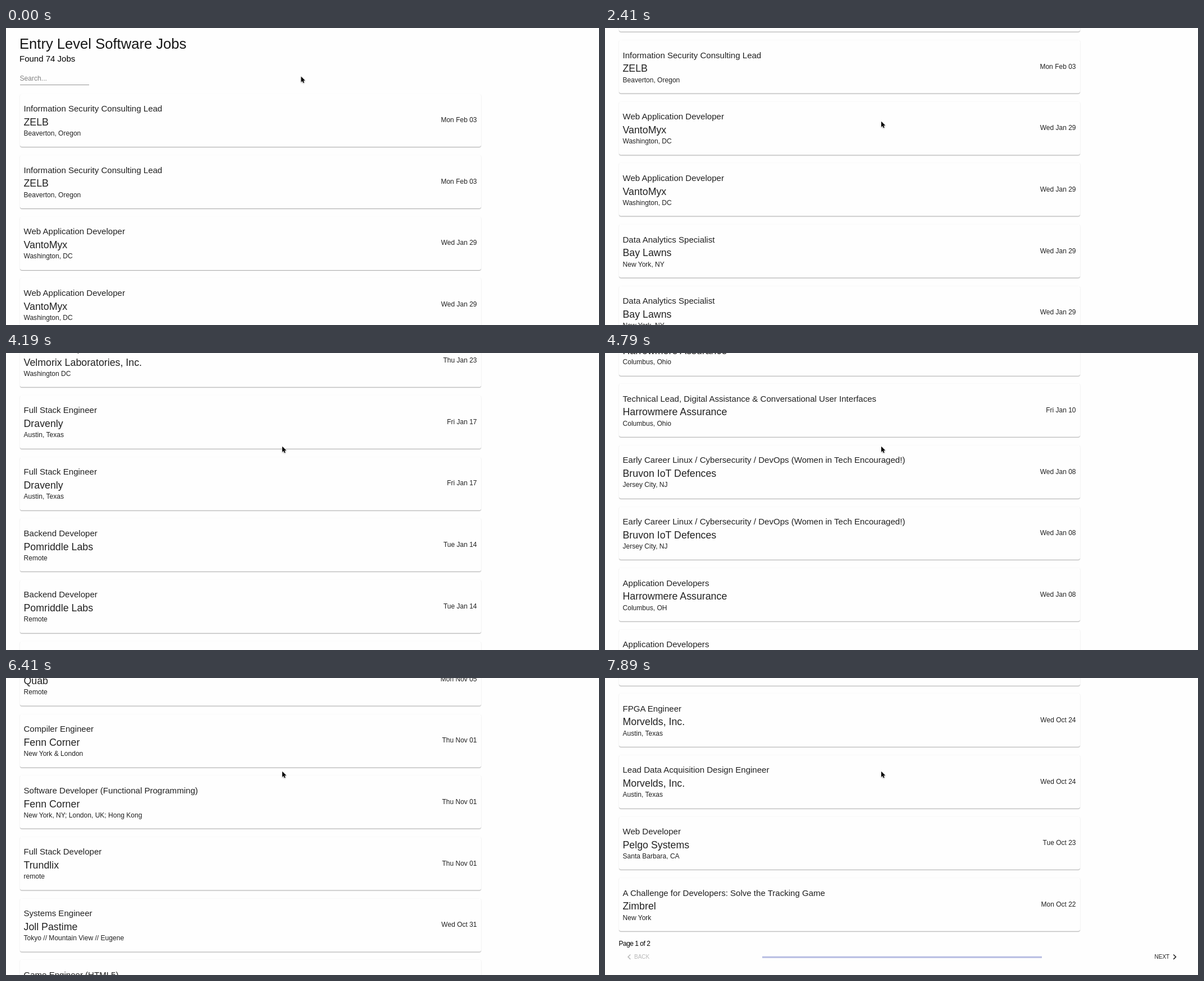
These frames come from a looping animation (1056x530 px, 8 s). An HTML page:

```html
<!DOCTYPE html>
<html lang="en">
<head>
<meta charset="utf-8">
<title>Job list</title>
<style>
  html, body { margin: 0; width: 100%; height: 100%; overflow: hidden; background: #fefefe; }
  body { position: relative; font-family: "Liberation Sans", Arial, sans-serif; color: #212121; }
  #page { position: absolute; left: 0; top: 0; width: 1056px; padding-top: 117.5px; box-sizing: border-box; }
  .pin { position: absolute; white-space: pre; }
  h1 { margin: 0; left: 24px; top: 12.1px; font: 25.6px/32px "Liberation Sans", Arial, sans-serif; color: #161616; }
  .found { left: 24px; top: 44.7px; font-size: 15px; line-height: 20px; color: #000; }
  .search { left: 24.5px; top: 82.2px; width: 123px; height: 19px; font-size: 12.1px; line-height: 16px;
    color: #808080; border-bottom: 1px solid #949494; }
  .card { display: flex; align-items: center; justify-content: space-between; box-sizing: border-box;
    margin: 0 0 14.77px 24.5px; width: 821.5px; padding: 14.4px 7.5px 16.3px 7px; border-radius: 3.4px;
    white-space: pre; background: #fefefe;
    box-shadow: 0 1px .6px rgba(0,0,0,.26), 0 .9px 2.4px rgba(0,0,0,.12); }
  .job { font-size: 15.06px; line-height: 23.8px; }
  .company { font-size: 17.8px; line-height: 25.2px; }
  .place { font-size: 12.06px; line-height: 15.2px; }
  .date { position: relative; top: 1px; font-size: 12px; line-height: 17.8px; }
  .date.narrow { width: 56px; }
  footer { position: relative; height: 63px; }
  .count { left: 24.5px; top: .4px; font-size: 12px; line-height: 14px; letter-spacing: -.5px; color: #000; }
  .button { top: 24.4px; font-size: 10px; line-height: 14px; }
  .bar { left: 279.5px; top: 29.8px; width: 498.5px; height: 2.8px; background: #b6bce2; }
  svg { position: absolute; left: 0; top: 0; overflow: visible; }
  .chevron { fill: none; stroke-width: 1.6; }
  #cursor { filter: drop-shadow(0 1px .8px rgba(0,0,0,.35)); }
</style>
</head>
<body>
<div id="page">
  <h1 class="pin">Entry Level Software Jobs</h1>
  <div class="pin found">Found 74 Jobs</div>
  <div class="pin search">Search...</div>
  <div id="list"></div>
  <footer>
    <div class="pin count">Page 1 of 2</div>
    <div class="pin button" style="left:52px;color:#b8b8b8">BACK</div>
    <div class="pin bar"></div>
    <div class="pin button" style="left:978.5px">NEXT</div>
    <svg width="1056" height="63">
      <path class="chevron" stroke="#b8b8b8" d="M45.3 26.8l-4.2 4.2 4.2 4.2"/>
      <path class="chevron" stroke="#212121" d="M1012.3 26.8l4.2 4.2-4.2 4.2"/>
    </svg>
  </footer>
</div>
<svg id="cursor" width="10" height="14">
  <path d="M0 0V10L2.3 7.9 3.9 11.5 5.6 10.8 4 7.2H7.2Z" fill="#000" stroke="#fff" stroke-width=".8" paint-order="stroke"/>
</svg>
<script>
// copies | job | company | place | date
const jobs = `
2|Information Security Consulting Lead|ZELB|Beaverton, Oregon|Mon Feb 03
2|Web Application Developer|VantoMyx|Washington, DC|Wed Jan 29
2|Data Analytics Specialist|Bay Lawns|New York, NY|Wed Jan 29
2|Junior Software Engineer|Ostrivane|Chicago, IL|Tue Jan 28
2|Front End Developer|Kelmory Group|Boston, MA|Mon Jan 27
2|DevOps Engineer (Remote)|ZipNeth|Oakland|Fri Jan 24
2|Software Developer|Larkenholme Gallery of Craft|Minneapolis|Thu Jan 23
2|Mobile Developer – Android, iOS|Velmorix Laboratories, Inc.|Washington DC|Thu Jan 23
2|Full Stack Engineer|Dravenly|Austin, Texas|Fri Jan 17
2|Backend Developer|Pomriddle Labs|Remote|Tue Jan 14
2|Technical Lead, Digital Assistance & Conversational User Interfaces|Harrowmere Assurance|Columbus, Ohio|Fri Jan 10
2|Early Career Linux / Cybersecurity / DevOps (Women in Tech Encouraged!)|Bruvon IoT Defences|Jersey City, NJ|Wed Jan 08
2|Application Developers|Harrowmere Assurance|Columbus, OH|Wed Jan 08
2|Web Developer|Tolvey Foundation|New York, New York|Mon Nov 19
2|RFP: JavaScript component for embedding a list of Podcast Episodes in Website Builders with specific/functionality for Wordpress|Murmelaatz|Remote|Mon Nov/19
2|Voice recording web app|Murmelatz|Remote|Mon Nov 19
2|Software Engineer|Ostrivane|New York|Mon Nov 12
2|Full Stack Engineer|Quab|Remote|Mon Nov 05
1|Compiler Engineer|Fenn Corner|New York & London|Thu Nov 01
1|Software Developer (Functional Programming)|Fenn Corner|New York, NY; London, UK; Hong Kong|Thu Nov 01
1|Full Stack Developer|Trundlix|remote|Thu Nov 01
1|Systems Engineer|Joll Pastime|Tokyo // Mountain View // Eugene|Wed Oct 31
1|Game Engineer (HTML5)|Joll Pastime|Tokyo // Mountain View // Eugene|Wed Oct 31
2|Software Engineer|Dravenly|San Francisco, CA|Tue Oct 30
2|Backend Developer|Kelmory Group|London|Mon Oct 29
1|Embedded Engineer|Morvelds, Inc.|Austin, Texas|Wed Oct 24
1|FPGA Engineer|Morvelds, Inc.|Austin, Texas|Wed Oct 24
1|Lead Data Acquisition Design Engineer|Morvelds, Inc.|Austin, Texas|Wed Oct 24
1|Web Developer|Pelgo Systems|Santa Barbara, CA|Tue Oct 23
1|A Challenge for Developers: Solve the Tracking Game|Zimbrel|New York|Mon Oct 22`;

const list = document.getElementById('list');
const page = document.getElementById('page');
const cursor = document.getElementById('cursor');

// A slash without spaces marks a line break.
const wrap = text => text.replace(/([^\s/])\/(?=[^\s/])/g, '$1\n');

function add(parent, className, text = '') {
  const box = document.createElement('div');
  box.className = className;
  box.textContent = text;
  return parent.appendChild(box);
}

for (const line of jobs.trim().split('\n')) {
  const [copies, job, company, place, date] = line.split('|');
  for (let i = 0; i < copies; i++) {
    const card = add(list, 'card');
    const text = add(card, 'text');
    add(text, 'job', wrap(job));
    add(text, 'company', company);
    add(text, 'place', place);
    add(card, date.includes('/') ? 'date narrow' : 'date', wrap(date));
  }
}

const LOOP = 8000;
// Screen updates: first time, last time, count
const bursts = [
  [300, 890, 5], [1340, 1640, 3], [2080, 2410, 3], [2550, 3000, 4], [3150, 3590, 4],
  [3740, 4190, 4], [4340, 5240, 7], [5390, 6410, 7], [6560, 7600, 8], [7740, 7890, 2]
];
// Scrolling ends with a small bounce at the bottom of the page.
const scrollTrack = [
  [1200, 0], [1640, 10], [2000, 10], [2080, 30], [2245, 95], [2410, 205.5], [3590, 1227],
  [4790, 2365.3], [5390, 3096], [6410, 4048.4], [7300, 5150], [7450, 5196], [7600, 5192],
  [7740, 5185], [7890, 5181.3]
];
const cursorTrack = [[150, 0], [300, .1], [600, .6], [740, .88], [890, 1]];

function snap(t) {
  let shown = 0;
  for (const [start, end, count] of bursts) {
    if (t < start) break;
    const gap = (end - start) / (count - 1);
    shown = start + Math.min(count - 1, Math.floor((t - start) / gap + 1e-6)) * gap;
  }
  return shown;
}

function valueAt(track, t) {
  const next = track.findIndex(([time]) => time >= t);
  if (next === 0) return track[0][1];
  if (next < 0) return track[track.length - 1][1];
  const [t0, v0] = track[next - 1], [t1, v1] = track[next];
  return v0 + (v1 - v0) * (t - t0) / (t1 - t0);
}

const begin = performance.now();
function draw() {
  const t = snap((performance.now() - begin) % LOOP);
  const moved = valueAt(cursorTrack, t);
  page.style.transform = `translateY(${-valueAt(scrollTrack, t)}px)`;
  cursor.style.transform = `translate(${525.5 - 33.5 * moved}px, ${86.5 + 80.2 * moved}px)`;
  requestAnimationFrame(draw);
}
draw();
</script>
</body>
</html>
```
